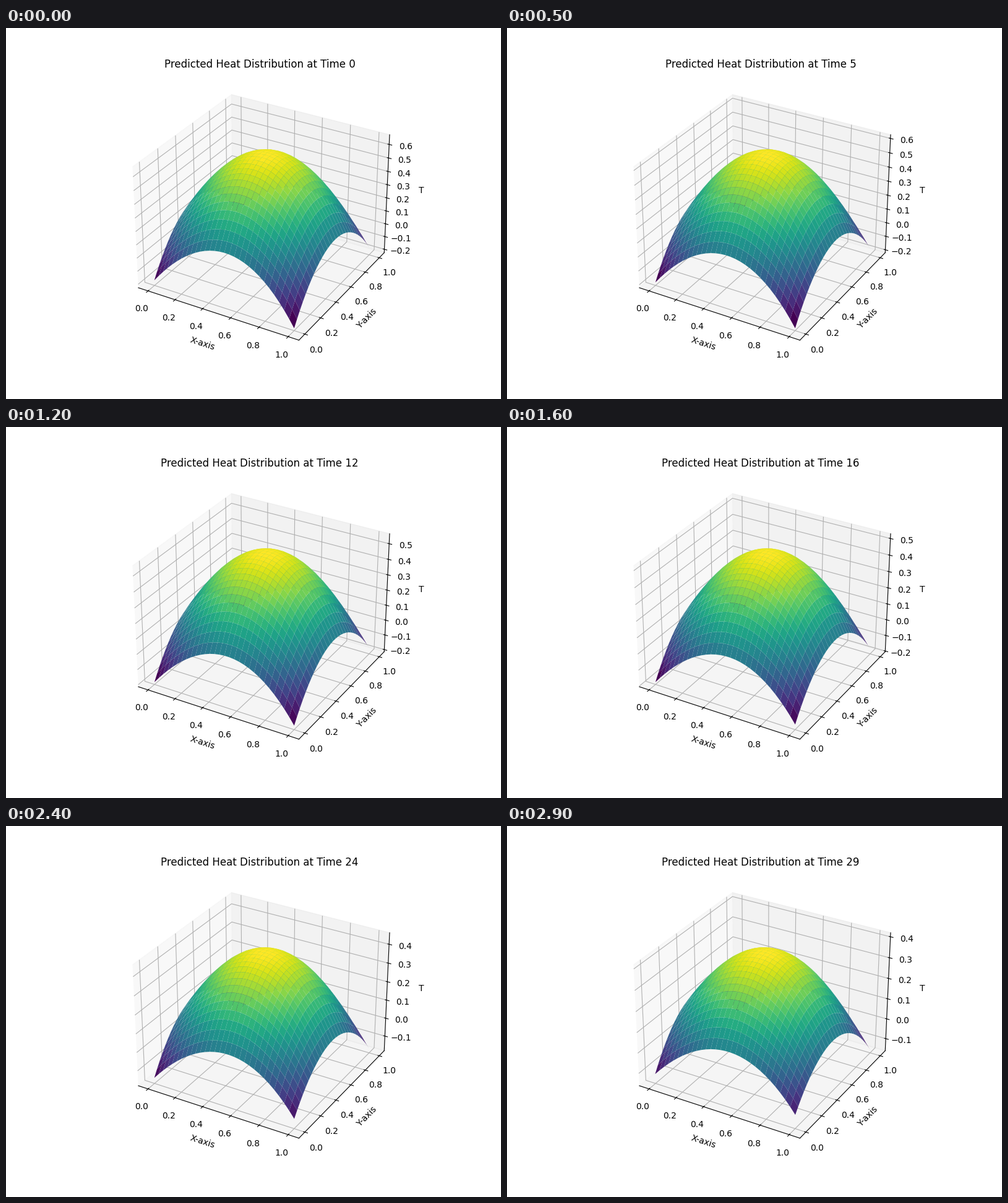
Recreate the animation shown at these times as a matplotlib script. Size 800 by 600 pixels, loop 3 s.

```python
import numpy as np
import matplotlib.pyplot as plt
from matplotlib.animation import FuncAnimation

STEPS = 30
GRID = 30
SKEW = 0.11

axis = np.linspace(0, 1, GRID)
X, Y = np.meshgrid(axis, axis)


def arch(s, skew=0):
    """Unit arch over 0..1, leaning to the right for a positive skew."""
    return 4 * s * (1 - s) * (1 + skew * (2 * s - 1))


def mix(a, b, s):
    return a + (b - a) * s


ARCH_X = arch(X, SKEW)
ARCH_Y = arch(Y)


def temperature(t):
    """Cooling dome: sloped base, an arch over each edge and a central bump."""
    s = t / (STEPS - 1)

    def cool(start, end, bow=0):
        return mix(start, end, s) + bow * arch(s)

    # Corners, named by their x and y
    c00 = cool(-0.187, -0.1145, -0.043)
    c10 = cool(-0.209, -0.0945, -0.027)
    c01 = cool(-0.185, -0.150, -0.024)
    c11 = cool(-0.171, -0.1466, -0.016)

    # Heights of the edge arches above their corners
    front = cool(0.387, 0.2105)
    back = cool(0.320, 0.210)
    left = cool(0.366, 0.253)
    right = cool(0.351, 0.208, 0.009)

    peak = cool(0.652, 0.407, -0.004)
    bump = peak - (c00 + c10 + c01 + c11) / 4 - (front + back + left + right) / 2

    base = mix(mix(c00, c10, X), mix(c01, c11, X), Y)
    edges = ARCH_X * mix(front, back, Y) + ARCH_Y * mix(left, right, X)
    return base + edges + bump * ARCH_X * ARCH_Y


fig = plt.figure(figsize=(8, 6), dpi=100)
ax = fig.add_subplot(111, projection="3d")


def draw(t):
    ax.clear()
    ax.plot_surface(X, Y, temperature(t), cmap="viridis")
    ax.set_title(f"Predicted Heat Distribution at Time {t}")
    ax.set_xlabel("X-axis")
    ax.set_ylabel("Y-axis")
    ax.set_zlabel("T")


anim = FuncAnimation(fig, draw, frames=STEPS, interval=100, repeat=True)
plt.show()
```
